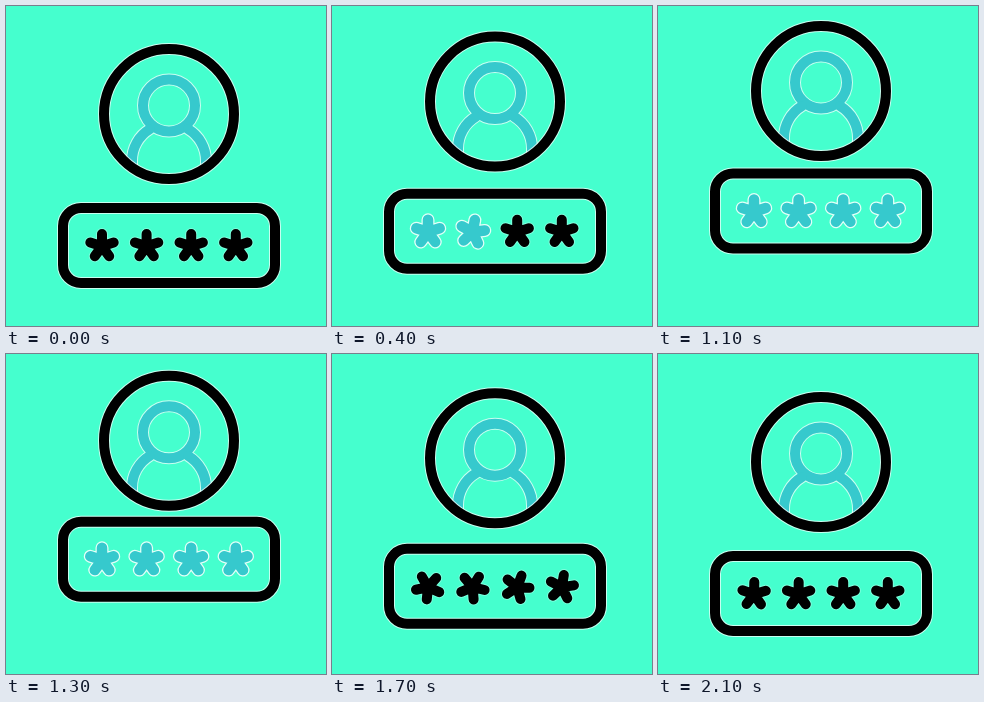
These frames come from a looping animation (320 px wide and 320 px high, 2200 ms). An HTML page:

```html
<!DOCTYPE html>
<html lang="en">
<head>
<meta charset="utf-8">
<title>Login</title>
<style>
  html, body { margin: 0; width: 100%; height: 100%; overflow: hidden; background: #45ffce; }
  svg { display: block; width: 100vw; height: 100vh; }
  use { fill: none; stroke-linecap: round; stroke-linejoin: round; }
  .line { stroke: currentColor; stroke-width: 10px; }
  .halo { stroke: #fff; stroke-width: 12px; opacity: .7; }
  .star.dark .halo { opacity: .3; }
  .star.teal .halo { stroke-width: 13px; opacity: .85; }
  .star.teal .line { stroke-width: 10.5px; }
  .dark { color: #000; }
  .teal { color: #36c9cd; }
</style>
</head>
<body>
<svg viewBox="0 0 320 320">
  <defs>
    <circle id="ring" cx="163" cy="108" r="65"/>
    <g id="person">
      <circle cx="163" cy="99.5" r="26"/>
      <path d="M126 159V155A37 37 0 0 1 144 123M200 159V155A37 37 0 0 0 182 123"/>
    </g>
    <rect id="field" x="57" y="202" width="212" height="75" rx="18"/>
    <path id="star"/>
  </defs>
  <g id="avatar">
    <g class="teal"><use href="#person" class="halo"/><use href="#person" class="line"/></g>
    <g class="dark"><use href="#ring" class="halo"/><use href="#ring" class="line"/></g>
  </g>
  <g id="password">
    <g class="dark"><use href="#field" class="halo"/><use href="#field" class="line"/></g>
  </g>
</svg>
<script>
  const LOOP = 2200, STEP = 100;
  const $ = id => document.getElementById(id);
  const avatar = $('avatar'), password = $('password');

  const progress = (t, from, to) => Math.min(1, Math.max(0, (t - from) / (to - from)));
  const smooth = p => p * p * (3 - 2 * p);
  const sine = p => (1 - Math.cos(Math.PI * p)) / 2;

  // Rise between the first two times, fall back between the last two
  function lift(el, t, height, up, top, down, end) {
    const y = height * (smooth(progress(t, down, end)) - smooth(progress(t, up, top)));
    el.setAttribute('transform', `translate(0 ${y.toFixed(2)})`);
  }

  let arms = '';
  for (let k = 0; k < 5; k++) {
    const a = (k * 72 - 90) * Math.PI / 180;
    arms += `M0 0L${(12.3 * Math.cos(a)).toFixed(2)} ${(12.3 * Math.sin(a)).toFixed(2)}`;
  }
  $('star').setAttribute('d', arms);

  const stars = Array.from({ length: 4 }, () => {
    const el = document.createElementNS('http://www.w3.org/2000/svg', 'g');
    el.innerHTML = '<use href="#star" class="halo"/><use href="#star" class="line"/>';
    password.append(el);
    return el;
  });

  // Stars spin one after another on the way up, almost together on the way back
  function spin(el, i, t) {
    const start = 50 + 175 * i, back = 1422 + 13.5 * (3 - i);
    const out = progress(t, start, start + 300);
    const turn = 360 * (sine(out) - sine(progress(t, back, back + 664)));
    el.setAttribute('class', out > .3 && t < 1600 ? 'star teal' : 'star dark');
    el.setAttribute('transform', `translate(${96 + 44.6 * i} 240.3) rotate(${turn.toFixed(2)})`);
  }

  function draw(now) {
    const t = Math.floor(now % LOOP / STEP) * STEP;
    lift(avatar, t, 23, 0, 760, 1180, 1880);
    lift(password, t, 34.5, 60, 830, 1265, 1880);
    stars.forEach((el, i) => spin(el, i, t));
  }

  const begin = performance.now();
  function tick() {
    draw(performance.now() - begin);
    requestAnimationFrame(tick);
  }
  tick();
</script>
</body>
</html>
```
